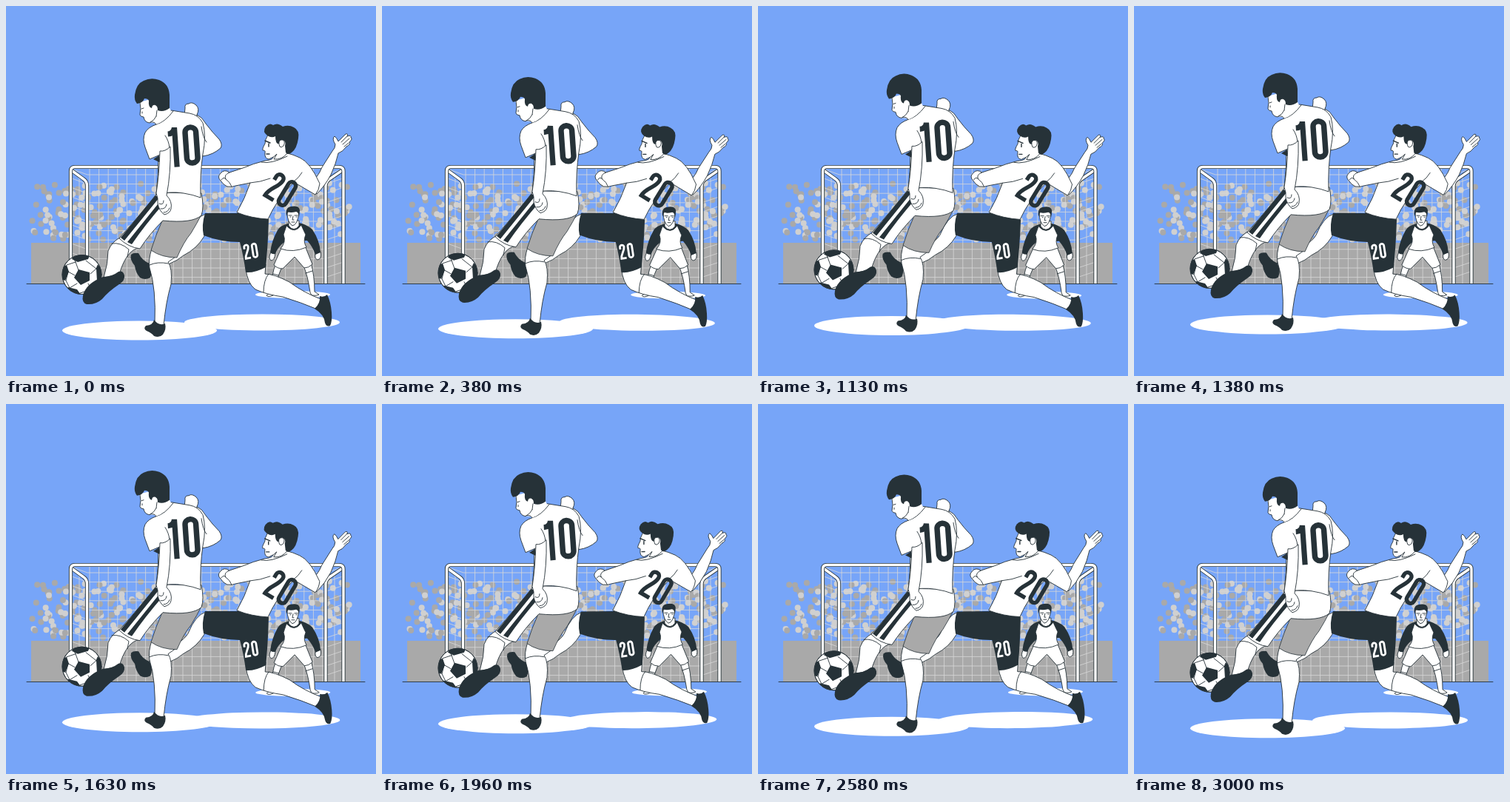
An HTML page for the animation above (3040 ms loop, 500 px wide and 500 px high).

```html
<!DOCTYPE html>
<html lang="en">
<head>
<meta charset="utf-8">
<title>Football match</title>
<style>
  html, body { margin: 0; width: 100%; height: 100%; overflow: hidden; background: #77a5f8 }
  svg { display: block; width: 100vw; height: 100vh }
  .ink { fill: #263238; stroke: none }
  .skin { fill: #fff; stroke: #263238; stroke-width: .9; stroke-linejoin: round }
  .line { fill: none; stroke: #263238; stroke-width: .9; stroke-linecap: round }
  .white { fill: #fff; stroke: none }
  .number { fill: none; stroke: #263238; stroke-width: 5.4 }
  .grey { fill: #a9a9a9 }
  .light { fill: #d0d0d0 }
  .net { fill: none; stroke: #d9d9d9; stroke-width: .8 }
  .bar { fill: none; stroke-linejoin: round }
  .outer { stroke: #263238; stroke-width: 5.2 }
  .inner { stroke: #fff; stroke-width: 3.4 }
</style>
</head>
<body>
<svg viewBox="0 0 500 500">
  <defs>
    <path id="zero" d="M-5.3-12.5a5.3 5 0 0 1 10.6 0v25a5.3 5 0 0 1-10.6 0z"/>
    <path id="one" d="M-6-14Q0-14 1-20V20"/>
    <path id="two" d="M-5.3-7v-5.5a5.3 5 0 0 1 10.6 0C5.3-1-5.3 5-5.3 17.3H8"/>
    <path id="backFrame" d="M87 221L105 234Q109.500 237 109.500 243V375M456 221L437 234Q432 238 432 243V375"/>
    <path id="frontFrame" d="M87.500 375V223Q87.500 217.500 93 217.500H450Q456 217.500 456 223V375"/>
    <clipPath id="ballEdge"><circle cx="102.500" cy="363" r="26.500"/></clipPath>
  </defs>

  <path class="grey" d="M34 320H479V375H34z"/>
  <g id="crowd"></g>
  <path class="net" id="net"/>
  <path class="line" d="M28 375.500H485"/>
  <use href="#backFrame" class="bar outer"/><use href="#backFrame" class="bar inner"/>
  <use href="#frontFrame" class="bar outer"/><use href="#frontFrame" class="bar inner"/>

  <g id="defence">
    <ellipse class="white" cx="387.500" cy="390" rx="50.500" ry="5"/>
    <ellipse class="white" cx="346" cy="427.500" rx="105" ry="11"/>

    <!-- goalkeeper -->
    <path class="skin" d="M365 348Q358 362 359 386L352 391Q354 394 361 391Q364 372 373 352z"/>
    <path class="skin" d="M402 351Q408 365 411 387L413 391Q420 392 423 390L417 386Q417 364 412 347z"/>
    <path class="line" d="M361 362l7 2M405 361l9-3"/>
    <path class="skin" d="M373 325L362 350Q367 355 374 355L390 339L403 354Q409 354 414 349L404 324z"/>
    <path class="skin" d="M358 333Q354 340 358 344Q363 344 364 334zM418 335Q417 342 421 343Q427 342 425 332z"/>
    <path class="ink" d="M381 294Q370 297 367 303Q359 317 357 333Q360 336 364 335Q367 326 376 319L407 317Q415 326 418 336L425 333Q424 317 414 302Q406 295 396 293z"/>
    <path class="skin" d="M379 297Q376 306 375 309Q379 319 371 328Q388 334 406 326Q401 318 405 309Q402 303 399 296Q390 309 379 297z"/>
    <path class="skin" d="M382 290V297Q389 306 396 297V290z"/>
    <path class="skin" d="M380 279Q380 292 387 297Q394 296 396 279Q389 273 380 279z"/>
    <path class="ink" d="M379 284Q377 272 385 271Q396 269 397 276L396 285Q395 278 392 278Q384 280 381 278z"/>
    <path class="line" d="M382 283h4M390 283h4M384 285h1M392 285h1M388 284l-1 5h2M386 292h4"/>

    <!-- tackling leg -->
    <path class="skin" d="M270 281Q256 285 246 310Q238 324 195 342L192 356Q224 351 240 337Q258 328 268 311z"/>
    <path class="ink" d="M169 336Q172 333 179 334Q184 344 194 348Q199 358 195 367Q188 371 181 367Q175 360 174 351Q167 343 169 336z"/>

    <!-- planted leg -->
    <path class="skin" d="M324 354Q326 375 337 383Q352 390 374 393Q400 401 421 410L428 397Q403 388 383 373Q362 362 350 362L351 349z"/>
    <path class="line" d="M355 362Q348 370 348 387"/>
    <path class="ink" d="M424 392Q430 394 434 390Q439 400 440 414Q441 426 438 432Q433 434 431 428Q430 417 417 409Q425 402 424 392z"/>
    <path class="ink" d="M269 280L315 280L355 288Q354 325 351 353Q336 361 324 360Q321 338 316 319Q290 319 267 310Q264 296 269 280z"/>
    <g class="number" style="stroke:#fff">
      <use href="#two" transform="translate(325.500 332) rotate(-9) scale(.52)"/>
      <use href="#zero" transform="translate(336 330.300) rotate(-9) scale(.52)"/>
    </g>

    <!-- raised arm -->
    <path class="skin" d="M411 238Q421 233 427 218L441 196Q445 192 445 187Q440 179 444 176Q447 178 449 183L459 173Q463 172 461 176Q467 174 466 178Q469 179 464 184Q466 187 460 190Q455 197 449 199Q446 213 439 228Q431 243 420 254z"/>
    <path class="line" d="M453 184L461 176M455 187L464 179M457 190L463 185"/>

    <!-- shirt and front arm -->
    <path class="skin" d="M361 202Q363 208 350 209Q334 213 320 219L302 225Q295 220 290 226Q285 231 290 236Q294 242 299 244Q306 245 310 243L330 239Q323 260 312 279Q332 287 354 288Q366 261 389 238L418 255Q423 249 424 240Q411 211 397 205Q389 201 377 198z"/>
    <path class="line" d="M302 225Q294 228 297 234Q303 238 305 244M291 235Q294 230 297 234M330 239Q344 238 357 233M345 211Q358 214 380 203M388 238Q396 232 400 225"/>
    <g class="number">
      <use href="#two" transform="translate(363.500 243.500) rotate(31)"/>
      <use href="#zero" transform="translate(380 253.500) rotate(31)"/>
    </g>

    <!-- head -->
    <path class="skin" d="M354 174Q350 181 350 186Q346 193 347 195Q351 195 350 198Q349 206 355 207Q363 204 366 200L362 207Q373 208 380 199L379 176z"/>
    <path class="ink" d="M353 175Q346 170 351 163Q356 157 361 161Q367 157 374 163Q382 160 389 164Q397 168 395 179Q393 193 386 198Q381 202 378 198L377 189Q379 183 374 181Q370 182 370 186Q364 188 364 176Q359 179 353 175z"/>
    <path class="line" d="M350 182L357 185M355 186v4M352 200h4" style="stroke-width:1.4"/>
    <path class="skin" d="M369 187Q368 180 374 181Q378 183 375 189Q372 192 370 190z"/>
  </g>

  <g id="striker">
    <ellipse class="white" cx="180.500" cy="438.500" rx="104.500" ry="13"/>

    <g id="ball">
      <circle class="skin" cx="102.500" cy="363" r="26.500"/>
      <g clip-path="url(#ballEdge)">
        <path class="line" d="M98 357L94 346M114 362L122 355M111 375L115 383M96 375L86 381M93 364L84 359M94 346L82 350M94 346L91 340M108 344L122 355M122 355L124 350M115 383L122 373M122 373L126 371M115 383L100 388M86 381L81 371M84 359L81 371"/>
        <path class="ink" d="M98 356L113 360L113 371L101 377L92 367zM89 342L97 346L111 342L114 335L94 334zM75 353L82 350L85 359L80 371L74 369zM122 355L124 350L132 356L130 372L123 372zM84 380L96 383L101 390L90 392L80 384zM116 383L122 375L128 374L122 387L113 390z"/>
      </g>
      <circle class="line" cx="102.500" cy="363" r="26.500"/>
    </g>

    <!-- far arm -->
    <path class="skin" d="M258 147Q262 139 257 134Q251 129 247 132Q241 132 242 138L241 148L263 174L276 188z"/>
    <path class="skin" d="M258 147Q265 150 270 159Q279 171 288 180Q293 187 290 192Q280 201 266 203Q259 185 258 147z"/>

    <!-- standing leg -->
    <path class="skin" d="M197 328Q192 343 194 354Q203 382 201 430L213 432Q216 400 223 376Q225 354 219 346L229 339z"/>
    <path class="line" d="M194 350Q205 345 219 348"/>
    <path class="ink" d="M200 424Q199 431 189 432Q185 436 190 439Q197 442 200 446Q207 449 212 444Q217 437 215 429Q207 433 200 424z"/>

    <!-- kicking leg -->
    <path class="skin" d="M156 312Q143 318 138 331Q138 348 132 367L153 363Q157 348 164 338Q172 327 181 327z"/>
    <path class="line" d="M143 321Q155 319 166 329L164 339"/>
    <path class="ink" d="M131 366Q143 366 152 359Q158 357 160 364Q161 371 153 376Q138 386 130 396Q121 404 109 403Q102 401 104 391Q108 375 131 366z"/>

    <!-- shorts -->
    <path d="M212 288Q202 310 196 330Q210 340 231 340Q240 319 250 307Q258 294 265 280z" fill="#a9a9a9" stroke="#263238" stroke-width=".8"/>
    <path class="skin" d="M205 252Q184 279 153 314Q165 326 181 328Q193 309 212 290Q252 294 264 283Q268 272 264 253z"/>
    <path class="ink" d="M202 256L207 259L160 317L155 313zM209 263L213 267Q187 297 170 322L164 319z"/>

    <!-- shirt -->
    <path class="skin" d="M203 160Q192 164 188 171Q184 180 188 191L194 207L206 202Q206 230 203 255Q221 250 240 253Q253 255 263 259Q262 227 266 200Q271 176 266 158Q260 147 248 145L223 141Q216 151 203 160z"/>
    <path class="line" d="M203 160Q215 157 226 142M206 202Q215 199 221 192Q220 182 215 175M264 163Q266 178 271 184"/>
    <path class="ink" d="M199 207L207 202V211z"/>
    <g class="number">
      <use href="#one" transform="translate(228 191) rotate(-4) scale(1.330)"/>
      <use href="#zero" transform="translate(250.500 188) rotate(-4) scale(1.380)"/>
    </g>

    <!-- near arm -->
    <path class="skin" d="M208 196Q207 228 203 253Q206 260 205 267Q207 277 214 282Q222 280 223 274Q225 264 217 256Q223 226 222 190Q215 197 208 196z"/>
    <path class="line" d="M207 267Q213 270 213 263M209 274Q216 275 217 268M213 279Q219 279 221 273"/>

    <!-- head -->
    <path class="white" d="M180 130Q183 139 181 147Q182 150 186 150Q187 156 193 158Q200 157 203 160Q215 156 223 142L214 121z"/>
    <path class="line" d="M181 130Q183 139 181 147Q182 150 186 150Q187 157 194 158Q201 154 203 149M195 157Q201 156 203 160"/>
    <path class="ink" d="M177 132Q173 127 174 120Q176 105 186 101Q196 96 207 100Q220 105 221 120V138Q213 144 205 141Q205 134 201 135Q199 139 197 138Q192 137 193 128Q192 125 187 125Q185 131 177 132z"/>
    <path class="line" d="M183 139l3-1M184 143v2M204 141L203 149"/>
    <path class="white" d="M197 139Q197 133 202 134Q206 137 202 143Q199 145 197 143z"/>
  </g>
</svg>
<script>
const LOOP = 3040, LIFT = 8.9, SWAY = 1;
const byId = id => document.getElementById(id);

let seed = 11;
const random = () => (seed = seed * 16807 % 2147483647) / 2147483647;

// Spectators: random dots, thinner near the sides.
let dots = '';
for (let i = 0; i < 400; i++) {
  const x = 35 + random() * 430, y = 239 + random() * 77;
  if ((x < 50 || x > 455) && random() < .55) continue;
  dots += `<circle class="${random() < .5 ? 'light' : 'grey'}" cx="${x}" cy="${y}" r="4"/>`;
}
byId('crowd').innerHTML = dots;

// Net: square mesh at the back, slanted mesh on both sides.
let mesh = '';
for (let x = 113; x < 432; x += 12.6) mesh += `M${x} 220V375`;
for (let y = 228; y < 375; y += 12.6) mesh += `M88 ${y - 8}L110 ${y}H432L456 ${y - 8}`;
for (const x of [99, 444]) mesh += `M${x} 229V375`;
byId('net').setAttribute('d', mesh);

// Triangle wave with peaks of 1 and -1, rising from 0.
const wave = p => 1 - 4 * Math.abs((p + .25) % 1 - .5);

function draw(now) {
  const p = now % LOOP / LOOP;
  const lift = LIFT * (1 - Math.abs(2 * p - 1));
  byId('striker').setAttribute('transform', `translate(0 ${-lift})`);
  byId('defence').setAttribute('transform', `rotate(${SWAY * wave(p)} 310 298)`);
  requestAnimationFrame(() => draw(performance.now()));
}
draw(performance.now());
</script>
</body>
</html>
```
